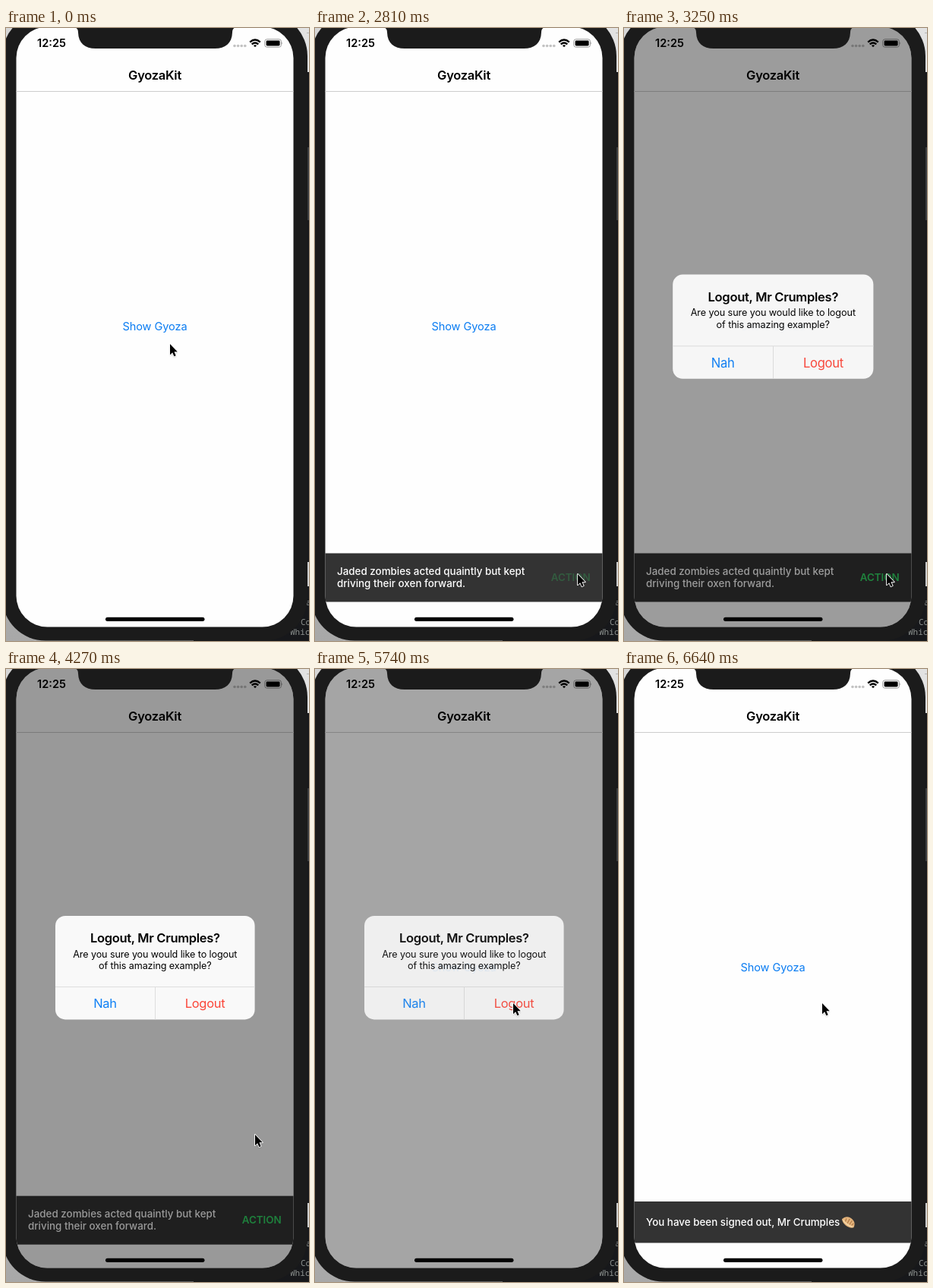
Animation of 399 by 807 pixels, one loop 8000 ms. Source, as an HTML page:

```html
<!DOCTYPE html>
<html lang="en">
<head>
<meta charset="utf-8">
<title>GyozaKit</title>
<style>
  html, body { margin: 0; width: 100%; height: 100%; overflow: hidden; background: #1b1b1b; }
  svg { display: block; width: 100%; height: 100%; font-family: Inter, Roboto, sans-serif; }
  .semi { font-weight: 600; }
  .mid { text-anchor: middle; }
  .nav { font-size: 16.5px; letter-spacing: -.3px; }
  .link { font-size: 14.6px; letter-spacing: -.1px; fill: #0a7cf2; }
  .toast { font-size: 13.4px; font-weight: 500; letter-spacing: 0; fill: #fff; }
  .msg { font-size: 12.6px; letter-spacing: -.1px; }
  .btn { font-size: 16.5px; letter-spacing: -.3px; }
  .code { font: 11px "Noto Sans Mono", monospace; fill: #8d918f; }
</style>
</head>
<body>
<svg viewBox="0 0 399 807">
  <defs>
    <clipPath id="screen"><rect x="13.5" y="-1.5" width="365" height="790" rx="41"/></clipPath>
    <filter id="soft" x="-50%" y="-50%" width="200%" height="200%"><feGaussianBlur stdDeviation="1"/></filter>
    <linearGradient id="desk" x2="0" y2="1">
      <stop stop-color="#d6d6d6"/><stop offset="1" stop-color="#a8a8a8"/>
    </linearGradient>
    <path id="arrow" d="M0 0V14.2L3.2 11.2L5.4 16.2L7.7 15.2L5.5 10.3H9.8Z"/>
  </defs>

  <!-- desktop behind the phone -->
  <rect width="399" height="807" fill="url(#desk)"/>
  <rect x="247" y="58" width="152" height="749" fill="#17181b"/>
  <path d="M330 0H399V58H330Z" fill="#e2e2e2"/>
  <path d="M396 6.5H399" stroke="#b5b5b5"/>
  <path d="M397 157H399V253H397Z" fill="#3b3d40"/>
  <path d="M396 703H399V735H396Z" fill="#cfcfcf"/>
  <g class="code">
    <text x="395" y="760">a</text>
    <text x="388" y="786">Co</text>
    <text x="374" y="799">Which</text>
  </g>
  <rect x="-5" y="-20" width="402" height="826.5" rx="57" fill="#1b1b1b"/>

  <g clip-path="url(#screen)">
    <rect y="-2" width="399" height="800" fill="#fefefe"/>
    <path d="M13 83.5H379" stroke="#cdcdcd"/>
    <text class="semi" x="41" y="25" font-size="14.6">12:25</text>
    <text class="semi mid nav" x="196" y="67.7">GyozaKit</text>
    <g fill="#c2c2c2">
      <circle cx="301" cy="23.5" r="1.8"/><circle cx="305.6" cy="23.5" r="1.8"/>
      <circle cx="310.2" cy="23.5" r="1.8"/><circle cx="314.8" cy="23.5" r="1.8"/>
    </g>
    <g fill="none" stroke="#000" stroke-width="2.3">
      <path d="M321.2 18.6Q328 12.4 334.8 18.6M323.7 21.4Q328 17.6 332.3 21.4"/>
      <path d="M325.9 22.9Q328 21.4 330.1 22.9L328 25.2Z" fill="#000" stroke="none"/>
    </g>
    <rect x="340.8" y="14.8" width="21.6" height="10.4" rx="2.8" fill="none" stroke="#9a9a9a"/>
    <rect x="342.6" y="16.5" width="18" height="7" rx="1.4"/>
    <path d="M363.4 18.2Q365 20 363.4 21.8Z" fill="#9a9a9a"/>

    <text id="show" class="mid link" x="196" y="398.3">Show Gyoza</text>

    <g id="ask">
      <rect x="13" y="691.5" width="366" height="64" fill="#333"/>
      <text class="toast" x="29" y="720">Jaded zombies acted quaintly but kept</text>
      <text class="toast" x="29" y="736.2">driving their oxen forward.</text>
      <text id="action" class="semi" x="310.7" y="728.2" font-size="13.4" fill="#32d463">ACTION</text>
    </g>
    <g id="done">
      <rect x="13" y="701" width="366" height="54.5" fill="#333"/>
      <text class="toast" x="29" y="733">You have been signed out, Mr Crumples</text>
      <g transform="translate(295.5 728.5) rotate(32)">
        <path d="M-9.5 1C-8 -6 -2 -7.5 3 -6S9 -1 9.5 2C6 6.5 -4 7 -9.5 1Z" fill="#e3b37b"/>
        <path d="M-7.5 1C-3 3.5 3 3.5 8 2" fill="none" stroke="#f4d6a6" stroke-width="1.6"/>
        <path d="M-5 -3L-4 1M-1 -5L-.5 1.5M3 -4.5L2.7 1.5M6.5 -2.5L5.5 1" stroke="#a8713f"/>
      </g>
    </g>

    <rect id="dim" y="-2" width="399" height="800"/>
    <g id="alert">
      <rect x="65" y="325" width="262.6" height="136.4" rx="13" fill="#f9f9f9"/>
      <path d="M65 418.5H327.6M196.5 418.5V461.4" stroke="#dedede" fill="none"/>
      <text class="semi mid nav" x="196.3" y="360">Logout, Mr Crumples?</text>
      <text class="mid msg" x="196.3" y="379.5">Are you sure you would like to logout</text>
      <text class="mid msg" x="196.3" y="395">of this amazing example?</text>
      <text class="mid btn" x="130.5" y="446.4" fill="#0f80f5">Nah</text>
      <text class="mid btn" x="262" y="446.4" fill="#fb4538">Logout</text>
    </g>
  </g>

  <path d="M90 -1Q95 0 95 6C95.5 20 104 27 118 27H275C289 27 297.5 20 298 6Q298 0 303 -1Z" fill="#1b1b1b"/>
  <rect x="131" y="775.7" width="130.5" height="5.2" rx="2.6"/>
  <g id="cursor">
    <use href="#arrow" y="1.2" opacity=".35" filter="url(#soft)"/>
    <use href="#arrow" stroke="#fff" stroke-width="1.8" stroke-linejoin="round"/>
    <use href="#arrow"/>
  </g>
</svg>

<script>
  const LOOP = 8000, STEP = 147.5;
  const $ = id => document.getElementById(id);
  const clamp = p => Math.min(1, Math.max(0, p));
  const prog = (t, start, dur) => clamp((t - start) / dur);
  const ease = p => p < .5 ? 2 * p * p : 1 - 2 * (1 - p) ** 2;
  const tween = (t, start, dur) => ease(prog(t, start, dur));

  // pointer moves: start, end, x, y
  const moves = [
    [60, 295, 202, 393],
    [860, 1327, 240, 417],
    [1820, 2360, 355, 705],
    [2360, 2510, 346, 719],
    [3600, 4270, 328, 613],
    [4770, 5452, 261, 440]
  ];

  function pointer(t) {
    let x = 216, y = 416;
    for (const [start, end, toX, toY] of moves) {
      const p = tween(t, start, end - start);
      x += (toX - x) * p;
      y += (toY - y) * p;
    }
    return `translate(${x} ${y})`;
  }

  // a pressed label drops to a faint tint, then fades back
  function press(t, down, up, low) {
    return t < down ? 1 : low + (1 - low) * prog(t, up, 180);
  }

  function slide(id, height, shown) {
    $(id).setAttribute('transform', `translate(0 ${height * (1 - shown)})`);
  }

  function render(t) {
    $('cursor').setAttribute('transform', pointer(t));
    $('show').setAttribute('opacity', press(t, 585, 860, .2));
    $('action').setAttribute('opacity', press(t, 2795, 3060, .25));

    slide('ask', 98, tween(t, 850, 450) - tween(t, 4230, 450));
    slide('done', 88.5, tween(t, 6160, 450));

    const settle = t < 3060 ? 1 : Math.exp((3060 - t) / 53);
    const shown = (1 - settle) * (1 - tween(t, 5690, 260));
    const scale = 1 + .2 * settle;
    $('dim').setAttribute('opacity', .4 * shown);
    $('alert').setAttribute('opacity', shown);
    $('alert').setAttribute('transform',
      `translate(196.3 393.2) scale(${scale}) translate(-196.3 -393.2)`);
  }

  const begin = performance.now();
  function tick(now) {
    const t = Math.max(0, now - begin) % LOOP;
    render(Math.floor((t + 14) / STEP) * STEP);
    requestAnimationFrame(tick);
  }
  render(0);
  requestAnimationFrame(tick);
</script>
</body>
</html>
```
